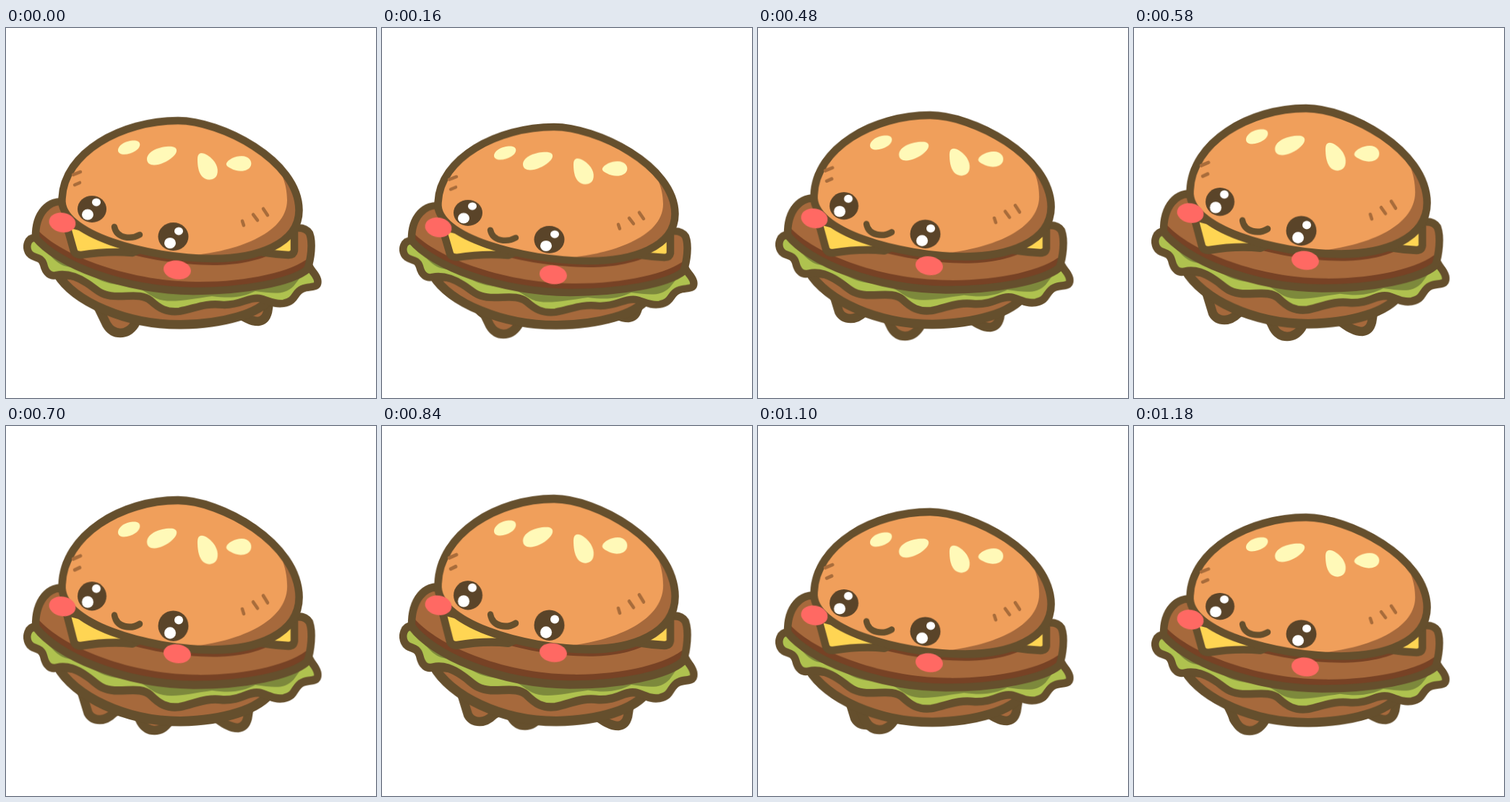
Write an HTML page without scripts that moves like this. It is 512 px wide and 512 px high and loops after 1200 ms.

```html
<!DOCTYPE html>
<html lang="en">
<head>
<meta charset="utf-8">
<title>Walking burger</title>
<style>
  html, body { margin: 0; width: 100%; height: 100%; overflow: hidden; background: #fff; }
  svg { display: block; width: 100vw; height: 100vh; }

  .ink { stroke: #654f2d; stroke-width: 10.5; stroke-linejoin: round; stroke-linecap: round; }
  .heavy { stroke-width: 12.5; }
  .crust { fill: #a6693c; }
  .shade { fill: #774225; }
  .cheese { fill: #ffd553; }
  .seeds { fill: #fff9b8; }
  .dashes { fill: none; stroke: #a86c3b; stroke-width: 4.5; stroke-linecap: round; }
  .eye { fill: #5a4429; }
  .cheeks { fill: #ff6963; }

  /* Squash and cheek bob share one sine-like swing, lowest at 200 ms. */
  .body, .cheeks { animation: squash 600ms cubic-bezier(.37, 0, .63, 1) -1000ms infinite alternate; }
  .body { transform-origin: 0 432px; }
  .cheeks { animation-name: bob; }
  @keyframes squash { from { transform: scaleY(.9697); } to { transform: scaleY(1.091); } }
  @keyframes bob { from { transform: translateY(14.2px); } to { transform: translateY(-14.2px); } }

  .leg { animation: 1200ms linear infinite; }
  .front { animation-name: front; }
  .back { animation-name: back; }
  .side { animation-name: side; }
  @keyframes front {
    0%, 100% { transform: translate(158px, 422px); }
    13.3% { transform: translate(168px, 423.5px); }
    30% { transform: translate(193px, 425.5px); }
    48.3% { transform: translate(212px, 427px); }
    70% { transform: translate(198px, 414.5px); }
    83.3% { transform: translate(178px, 418.5px); }
  }
  @keyframes back {
    0%, 100% { transform: translate(155px, 415px); }
    13.3% { transform: translate(149px, 397px); }
    30% { transform: translate(132px, 399.5px); }
    48.3% { transform: translate(125px, 404px); }
    70% { transform: translate(135px, 409px); }
    83.3% { transform: translate(145px, 412.5px); }
  }
  @keyframes side {
    0%, 100% { transform: translate(348px, 406px); }
    13.3% { transform: translate(340px, 401px); }
    30% { transform: translate(327px, 407px); }
    48.3% { transform: translate(315px, 420px); }
    70% { transform: translate(326px, 415px); }
    83.3% { transform: translate(339px, 410px); }
  }
</style>
</head>
<body>
<svg viewBox="0 0 512 512">
  <defs>
    <path id="bun" d="M77.500 236C80 172 160 128 238 128C296 128 405 182 405.500 252C405.500 300 345 319 287 319C195 319 73 285 77.500 236Z"/>
    <path id="patty" d="M82 241C60 236 40 256 41 290C70 326 160 363 260 364C330 364 395 352 417 334C422 320 425 297 420 284Q414 275 400 277Z"/>
    <clipPath id="inBun"><use href="#bun"/></clipPath>
    <clipPath id="inPatty"><use href="#patty"/></clipPath>
  </defs>

  <g class="crust ink heavy">
    <path class="leg back" d="M-27-45L-16-9Q-11 0 0 0Q10 0 19-9L39-21"/>
    <path class="leg side" d="M-34-18Q-14 0 1 0Q11-1 14-13L19-45"/>
    <path class="leg front" d="M-33-41L-19-12Q-12 0 0 0Q12 0 20-12L33-41"/>
  </g>

  <g class="body">
    <path class="crust ink heavy" d="M71 340C94 378 165 411 242 410.500C300 409.500 350 396 368 372Z"/>

    <g id="lettuce">
      <path class="ink" fill="#afc24f" d="M40 290C30 290 27 302 31 310C36 320 48 314 52 327C55 340 62 344 70 342C85 339 98 344 112 353C125 361 130 370 150 371C170 372 188 367 200 377C212 388 222 394 240 392C262 388 275 380 300 383C325 384 335 372 350 374C362 376 370 383 384 381C402 378 398 366 410 361C420 356 434 362 431 348C428 338 420 335 418 325L260 340Z"/>
      <path fill="#7d893c" d="M45 292C62 318 72 330 92 331C120 339 125 352 155 355C185 355 190 365 208 374C225 382 255 375 285 371C315 375 330 371 345 364C370 367 385 370 398 357L415 335L270 350Z"/>
    </g>

    <use href="#patty" class="crust"/>
    <g class="shade" clip-path="url(#inPatty)">
      <path d="M40 275C70 312 165 350 262 351C330 352 395 338 420 317L425 370H40Z"/>
      <use href="#bun" y="9"/>
    </g>
    <use href="#patty" class="ink" fill="none"/>

    <g class="cheese ink">
      <path d="M83 270L94 309Q96 314 104 314Q140 308 175 311L200 300Z"/>
      <path d="M399 275V308Q398 314 391 314Q370 313 350 310L380 280Z"/>
    </g>

    <use href="#bun" fill="#f09f5b"/>
    <path class="crust" clip-path="url(#inBun)" d="M358 170C379 190 389 213 389 238C389 287 312 309 262 314L290 325L420 300L410 200Z"/>
    <use href="#bun" class="ink" fill="none"/>

    <g class="seeds">
      <path d="M155 169C156 159 172 154 181 156C188 158 186 166 179 170C170 176 155 177 155 169Z"/>
      <path d="M195 181C196 169 216 163 230 164C238 165 238 172 231 178C218 190 195 195 195 181Z"/>
      <path d="M265 181C265 172 271 171 279 176C290 183 295 194 292 203C289 211 277 212 271 205C266 199 265 190 265 181Z"/>
      <path d="M305 187C307 182 317 177 326 177C336 177 341 184 339 190C336 199 321 200 311 194C307 192 304 190 305 187Z"/>
    </g>

    <path class="dashes" d="M93 203L103 199M95 217L102 214M327 267L329 273M342 258L348 266M356 250L362 259"/>

    <g id="face">
      <ellipse class="eye" cx="119" cy="250.500" rx="20" ry="18.500"/>
      <ellipse class="eye" cx="231.500" cy="288.500" rx="21" ry="19.500"/>
      <g fill="#fff">
        <ellipse cx="125" cy="241" rx="6" ry="5.500"/>
        <ellipse cx="113" cy="258" rx="8" ry="7.500"/>
        <ellipse cx="239" cy="281" rx="6" ry="5.500"/>
        <ellipse cx="227" cy="297.500" rx="8" ry="7.500"/>
      </g>
      <path class="ink" style="stroke-width:8.500" fill="none" d="M150 275C153 291 173 293 185 286"/>
    </g>
  </g>

  <g class="cheeks">
    <ellipse cx="78" cy="262" rx="18.500" ry="13.500" transform="rotate(10 78 262)"/>
    <ellipse cx="237" cy="327.500" rx="19" ry="13" transform="rotate(8 237 327)"/>
  </g>
</svg>
</body>
</html>
```
